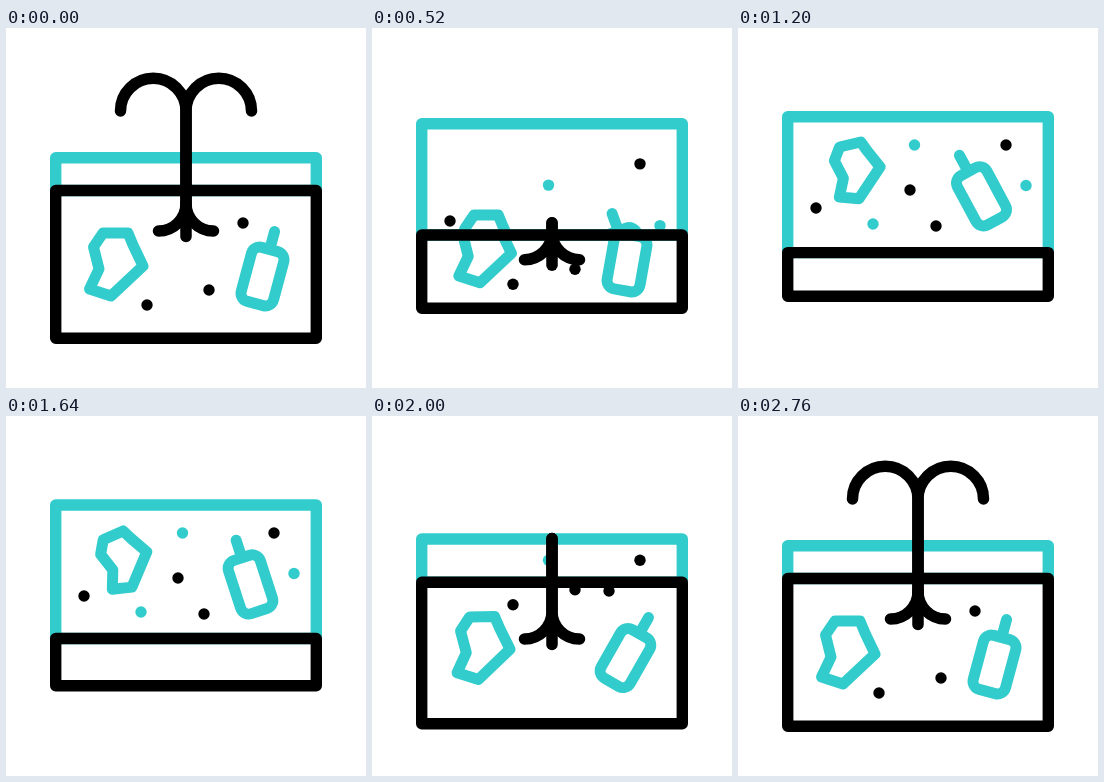
Write an HTML page with a canvas that moves like this. It is 360 px wide and 360 px high and loops after 3 s.

```html
<!DOCTYPE html>
<html lang="en">
<head>
<meta charset="utf-8">
<title>Water tank</title>
<style>
  html, body { margin: 0; width: 100%; height: 100%; overflow: hidden; background: #fff; }
  canvas { display: block; width: 100vmin; height: 100vmin; margin: auto; }
</style>
</head>
<body>
<canvas id="stage"></canvas>
<script>
const SIZE = 360, LOOP = 3000, STEP = 40;
const TEAL = '#33cccc', BLACK = '#000';
const canvas = document.getElementById('stage');
const ctx = canvas.getContext('2d');
const ratio = Math.max(1, window.devicePixelRatio || 1);
canvas.width = canvas.height = SIZE * ratio;

const mix = (a, b, k) => a + (b - a) * k;

function ease(p, power) {
  p = Math.min(1, Math.max(0, p));
  const half = x => Math.pow(2 * x, power) / 2;
  return p < 0.5 ? half(p) : 1 - half(1 - p);
}

// 0 -> 1 centred on `out`, then 1 -> 0 centred on `back`
function trip(t, out, back, span = 800, power = 3) {
  const at = mid => ease((t - mid) / span + 0.5, power);
  return at(out) - at(back);
}

// Smooth curve through [time, value] keys, flat at both ends
function curve(t, keys) {
  const last = keys.length - 1;
  if (t <= keys[0][0]) return keys[0][1];
  if (t >= keys[last][0]) return keys[last][1];
  const i = keys.findIndex(k => k[0] > t) - 1;
  const slope = n => n < 1 || n >= last ? 0
    : (keys[n + 1][1] - keys[n - 1][1]) / (keys[n + 1][0] - keys[n - 1][0]);
  const [t0, v0] = keys[i], [t1, v1] = keys[i + 1];
  const d = t1 - t0, u = (t - t0) / d, w = 1 - u;
  return v0 * (1 + 2 * u) * w * w + v1 * (3 - 2 * u) * u * u
    + slope(i) * d * u * w * w - slope(i + 1) * d * u * u * w;
}

const BAG = [[-13, -32], [12, -32], [17, -20], [27, 1], [-5, 31], [-26.5, 24], [-17, 4], [-22.5, -18]];

const BOTTLE = {
  upperTilt: [[0, -8], [520, -20], [840, -33], [1640, -18], [1880, -11], [2300, -5]],
  upperX: [[300, 258], [520, 256], [840, 245], [1640, 244.5], [1880, 247], [2300, 250]],
  lowerTilt: [[120, 15], [520, 10], [900, 5], [1500, 20], [1880, 27], [2160, 31], [2650, 15]],
  lowerX: [[120, 256.5], [520, 255], [1880, 252], [2200, 256.5]]
};

// x, resting y, colour, rise time, sink time
const UPPER_DOTS = [
  [268, 117, BLACK, 415, 2073],
  [78, 180, BLACK, 386, 2073],
  [172, 162, BLACK, 636, 2065],
  [198, 198, BLACK, 520, 2073],
  [176.5, 117, TEAL, 485, 2073],
  [288, 157.5, TEAL, 485, 2150],
  [135, 196, TEAL, 590, 2073]
];

// x, resting y, lift
const LOWER_DOTS = [[237, 195, 25], [203, 262, 110], [141, 277, 110]];

function pen(color, width) {
  ctx.strokeStyle = color;
  ctx.lineWidth = width;
  ctx.lineCap = ctx.lineJoin = 'round';
}

function box(top, bottom, color) {
  pen(color, 11.4);
  ctx.strokeRect(49.7, top, 260.6, bottom - top);
}

function dot(x, y, color) {
  ctx.fillStyle = color;
  ctx.beginPath();
  ctx.arc(x, y, 5.7, 0, Math.PI * 2);
  ctx.fill();
}

function placed(x, y, degrees, trace) {
  ctx.save();
  ctx.translate(x, y);
  ctx.rotate(degrees * Math.PI / 180);
  ctx.beginPath();
  trace();
  pen(TEAL, 11);
  ctx.stroke();
  ctx.restore();
}

function bag(x, y, degrees, scale) {
  placed(x, y, degrees, () => {
    BAG.forEach(([px, py]) => ctx.lineTo(px * scale, py * scale));
    ctx.closePath();
  });
}

function bottle(x, y, degrees) {
  placed(x, y, degrees, () => {
    ctx.roundRect(-16.7, -28, 33.4, 56, 8.5);
    ctx.moveTo(0, -28);
    ctx.lineTo(0, -46.5);
  });
}

function clipped(top, bottom, paint) {
  ctx.save();
  ctx.beginPath();
  ctx.rect(44, top, 272, bottom - top);
  ctx.clip();
  paint();
  ctx.restore();
}

function upperDebris(t) {
  for (const [x, y, color, rise, sink] of UPPER_DOTS) {
    dot(x, y + 110 * (1 - trip(t, rise, sink, 700)), color);
  }
  const lift = trip(t, 625, 1923);
  const turn = -24 * (ease((t - 700) / 950, 2) - ease((t - 1680) / 640, 2));
  bag(mix(113.5, 119, lift), mix(237, 143.5, lift), turn, mix(1, 0.87, lift));
  bottle(curve(t, BOTTLE.upperX), mix(249, 168.3, trip(t, 605, 1976)), curve(t, BOTTLE.upperTilt));
}

function lowerDebris(t) {
  const float = trip(t, 603, 2080, 600);
  LOWER_DOTS.forEach(([x, y, lift]) => dot(x, y - lift * float, BLACK));
  const lift = trip(t, 660, 1784);
  const drift = trip(t, 560, 1860);
  bag(110 + 8 * drift, 237 - 92 * lift, -4 * trip(t, 900, 1930, 500), mix(1, 0.87, lift));
  bottle(curve(t, BOTTLE.lowerX), 248.5 - 80 * trip(t, 640, 1818), curve(t, BOTTLE.lowerTilt));
}

function plant(t) {
  const length = 239 * (1 - trip(t, 422, 2004, 820));
  const stub = 33 * (1 - trip(t, 660, 1965, 350));
  ctx.save();
  ctx.translate(180, 40 * trip(t, 448, 2000, 826));
  pen(BLACK, 11.5);
  if (length > 0.5) {
    // Each half grows from its root tip up to its leaf tip
    ctx.setLineDash(length > 238.5 ? [] : [length, 999]);
    for (const side of [1, -1]) {
      ctx.save();
      ctx.scale(side, 1);
      ctx.beginPath();
      ctx.arc(-27.5, 175.5, 27.5, Math.PI / 2, 0, true);
      ctx.lineTo(0, 83);
      ctx.arc(-32.75, 83, 32.75, 0, Math.PI, true);
      ctx.stroke();
      ctx.restore();
    }
    ctx.setLineDash([]);
  }
  if (stub > 0.1) {
    ctx.beginPath();
    ctx.moveTo(0, 208.5);
    ctx.lineTo(0, 208.5 - stub);
    ctx.stroke();
  }
  ctx.restore();
}

function draw(t) {
  ctx.setTransform(ratio, 0, 0, ratio, 0, 0);
  ctx.fillStyle = '#fff';
  ctx.fillRect(0, 0, SIZE, SIZE);

  const drain = trip(t, 467, 1835, 800, 4);
  const surface = mix(162.5, 224.6, drain);
  const base = mix(310.3, 268.3, drain);
  const rim = mix(129.8, 88.7, trip(t, 426, 1904, 800, 4));

  box(rim, surface, TEAL);
  clipped(rim, surface, () => upperDebris(t));
  clipped(surface, base, () => lowerDebris(t));
  box(surface, base, BLACK);
  plant(t);
}

const start = performance.now();
function tick() {
  const t = (performance.now() - start) % LOOP;
  draw(Math.floor(t / STEP) * STEP);
  requestAnimationFrame(tick);
}
tick();
</script>
</body>
</html>
```
